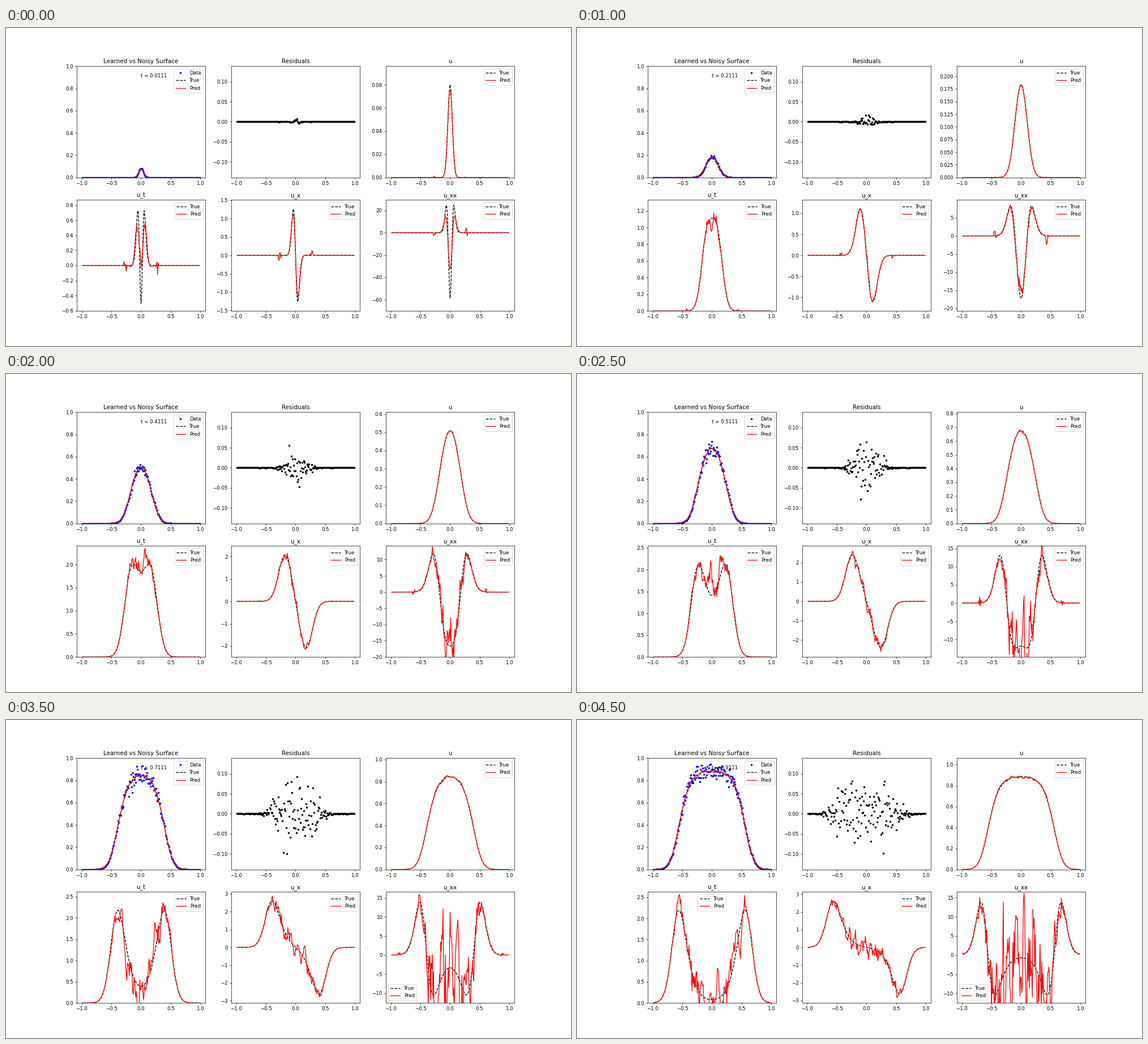
A matplotlib script that plays this animation: 998 by 561 pixels, repeating every 5 s.

```python
import numpy as np
import matplotlib.pyplot as plt
from matplotlib.animation import FuncAnimation

FRAMES, INTERVAL = 10, 500
DX, DT, SUB = 0.01, 1 / 90, 40
DIFF, GROWTH, CROWD = 0.02, 10.0, 11.2
NOISE, HALF_X, HALF_T = 0.05, 6, 3

rng = np.random.default_rng(7)


def rate(u):
    p = np.pad(u, 1, mode="edge")
    lap = (p[2:] - 2 * u + p[:-2]) / DX**2
    return DIFF * lap + GROWTH * u - CROWD * u**2


def simulate(steps):
    """Reaction-diffusion surface u[t, x] grown from a small bump."""
    x = np.linspace(-1, 1, 201)
    z2 = x**2 / 0.001
    u = 0.0852 * np.exp(-z2 / 2) * (1 + 0.012 * (z2**2 - 6 * z2 + 3))
    rows, h = [u], DT / SUB
    for _ in range(steps):
        for _ in range(SUB):
            a = rate(u)
            u = u + h / 2 * (a + rate(u + h * a))
        rows.append(u)
    return x, np.array(rows)


x, u = simulate(90)
u_t = np.gradient(u, DT, axis=0)
u_x = np.gradient(u, DX, axis=1)
u_xx = np.zeros_like(u)
u_xx[:, 1:-1] = (u[:, 2:] - 2 * u[:, 1:-1] + u[:, :-2]) / DX**2
x, u, u_t, u_x, u_xx = x[1:-1], *(a[:, 1:-1] for a in (u, u_t, u_x, u_xx))
data = u * (1 + NOISE * rng.standard_normal(u.shape))


def local_fit(n, i):
    """Polynomial fit in x and t around one grid point: u, u_t, u_x, u_xx."""
    rows = np.arange(max(0, n - HALF_T), n + HALF_T + 1)
    cols = np.arange(max(0, i - HALF_X), min(len(x), i + HALF_X + 1))
    r, c = (g.ravel() for g in np.meshgrid(rows, cols, indexing="ij"))
    keep = rng.random(r.size) < 0.8
    r, c = r[keep], c[keep]
    a, b = (c - i) / HALF_X, (r - n) / HALF_T
    basis = np.column_stack([np.ones_like(a), a, b, a * a, a * b, b * b,
                             a**3, a * a * b])
    k = np.linalg.lstsq(basis, data[r, c], rcond=None)[0]
    lx, lt = HALF_X * DX, HALF_T * DT
    return k[0], k[2] / lt, k[1] / lx, 2 * k[3] / lx**2


def predict(n):
    t = n * DT
    pred = np.array([local_fit(n, i) for i in range(len(x))]).T
    # small bursts where the surface first rises above zero
    edge = np.abs(np.abs(x) - 0.26 - 0.86 * t) < 0.022
    size = (0.0007 * np.exp(-3 * t), 0.07 * np.exp(-8 * t),
            0.07 * np.exp(-3 * t), 2.3 * np.exp(-3 * t))
    for row, s in zip(pred, size):
        row[edge] += s * rng.standard_normal(edge.sum())
    return pred


steps = [1 + 9 * k for k in range(FRAMES)]
preds = [predict(n) for n in steps]

fig, axes = plt.subplots(2, 3, figsize=(16, 8.994), dpi=62.375)
axes = axes.ravel()
titles = ["Learned vs Noisy Surface", "Residuals", "u", "u_t", "u_x", "u_xx"]
for ax, title in zip(axes, titles):
    ax.set_title(title)
    ax.set_xlim(-1.089, 1.089)


def curves(ax):
    true, = ax.plot(x, 0 * x, "k--", label="True")
    pred, = ax.plot(x, 0 * x, "r-", label="Pred")
    return true, pred, ax.legend(loc="upper right")


dots, = axes[0].plot(x, 0 * x, "b.", label="Data")
surface = curves(axes[0])
label = axes[0].text(0, 0.9, "")
axes[0].set_ylim(0, 1)
resid, = axes[1].plot(x, 0 * x, "k.")
axes[1].set_ylim(-0.139, 0.139)
panels = [curves(ax) for ax in axes[2:]]


def update(k):
    n = steps[k]
    pred = preds[k]
    dots.set_ydata(data[n])
    surface[0].set_ydata(u[n])
    surface[1].set_ydata(pred[0])
    label.set_text(f"t = {n * DT:.4f}")
    resid.set_ydata(data[n] - pred[0])
    for ax, (line, fit, _), full, p in zip(axes[2:], panels,
                                           (u, u_t, u_x, u_xx), pred):
        line.set_ydata(full[n])
        fit.set_ydata(p)
        ax.set_ylim(1.2 * min(0, full[n].min()), 1.2 * full[n].max())
    panels[1][2].set_loc("upper center" if k == 9 else "upper right")
    panels[3][2].set_loc("lower left" if k >= 7 else "upper right")
    return []


anim = FuncAnimation(fig, update, frames=FRAMES, interval=INTERVAL,
                     repeat=True, repeat_delay=0, blit=False)
plt.show()
```
